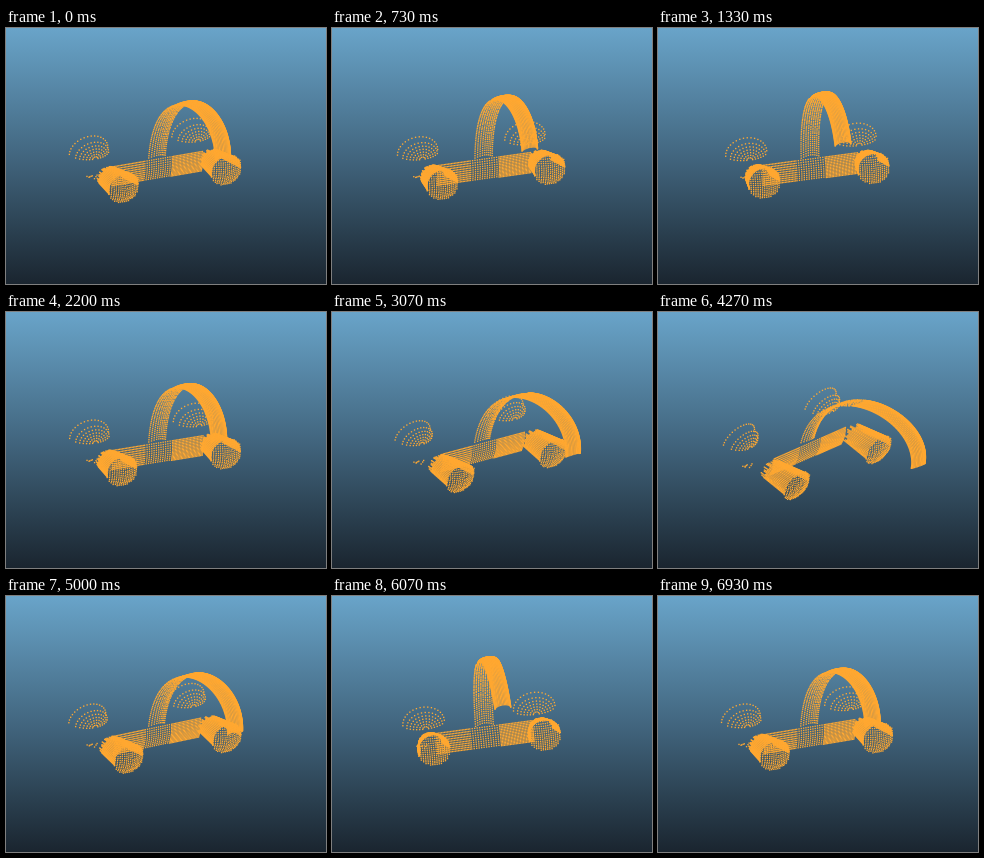
An HTML page with a canvas that plays this animation: 320 px wide and 256 px high, repeating every 6.99 s.

```html
<!DOCTYPE html>
<html>
<head>
<meta charset="utf-8">
<title>Point cloud</title>
<style>
html, body { margin: 0; width: 100%; height: 100%; overflow: hidden; background: #1b2630; }
canvas { display: block; }
</style>
</head>
<body>
<canvas id="stage" width="320" height="256"></canvas>
<script>
const ctx = document.getElementById('stage').getContext('2d');
const LOOP = 6990, STEPS = 105;
const { sin, cos, PI, abs, floor, sqrt } = Math;
const mix = (a, b, u) => a + (b - a) * u;

let seed = 7;
const random = () => (seed = seed * 16807 % 2147483647) / 2147483647;
const jitter = size => (random() - .5) * size;

// The camera swings between these turning points: time, yaw
const turns = [[-1020, .07], [130, .47], [1060, .16], [4200, .92], [5970, .07], [7120, .47]];

function yawAt(t) {
  const i = turns.findIndex(turn => turn[0] > t);
  const [t0, from] = turns[i - 1], [t1, to] = turns[i];
  const u = (t - t0) / (t1 - t0);
  return mix(from, to, mix(u, (1 - cos(PI * u)) / 2, .5));
}

const points = [];
const add = (x, y, z) => points.push([x, y, z]);

function addBar() {
  for (let x = -49; x < 49; x += abs(x) < 15 ? 2.5 : 1.5)
    for (let y = 0; y > -23; y -= x > 15 ? 1.6 : 2.4) add(x, y, 1.5 * sin(-y / 7));
}

const bezier = (a, b, c, d, u) => {
  const v = 1 - u;
  return a * v * v * v + 3 * b * v * v * u + 3 * c * v * u * u + d * u * u * u;
};

// Thin sheet at the post, solid half tube along the front
function addHandle() {
  for (let u = 0; u <= 1; u += u < .4 ? .009 : .006) {
    const solid = u > .4, n = solid ? 18 : 8, r = solid ? 8 : 9;
    for (let i = 0; i <= n; i++) {
      const f = PI * i / n;
      const w = solid ? 0 : jitter(.03 * u);
      const lift = r * sin(f) * (solid ? .75 : .45);
      add(1 + 8 * u - r * (solid ? cos(f) : 1 - 2 * i / n),
        bezier(0, 95, 135, 70, u + w) + lift,
        bezier(-5, -8, 128, 132, u + w) + lift);
    }
  }
}

function addFrontLeg(side) {
  const cx = side * 56, front = 42;
  for (let d = 0; d <= 200; d += 6) {
    const f = d * PI / 180;
    for (let z = 3 + random() * 8; z <= front; z += 1.5) {
      const k = z / front, r = mix(11, 16, k);
      add(cx + r * cos(f), 9 * (k - 1) + r * sin(f), z);
    }
  }
  for (let x = -16; x <= 16; x += 2.2)
    for (let y = -18; y <= 16; y += 2.2) {
      const q = (x * x + y * y) / 300;
      if (q <= 1) add(cx + x, y, front + 5 * (1 - q) + jitter(1));
    }
}

function addBackDome(side) {
  for (let j = 1; j <= 7; j++) {
    const s = j / 7, n = 3 + 2 * j;
    for (let i = 0; i <= n; i++) {
      const f = PI * i / n;
      add(side * 56 + 21 * s * cos(f), -5 + 17 * s * sin(f), -45 + 17 * sqrt(1 - s * s));
    }
  }
}

addBar();
addHandle();
for (const side of [-1, 1]) {
  addFrontLeg(side);
  addBackDome(side);
}
for (let i = 0; i < 8; i++) add(-67 + 1.4 * i, -20 + jitter(4), -20 + jitter(4));

const sky = ctx.createLinearGradient(0, 0, 0, 256);
sky.addColorStop(0, '#69a4c9');
sky.addColorStop(.5, '#42667f');
sky.addColorStop(1, '#1a252f');

function draw(t) {
  const yaw = yawAt(t), pitch = .345 + .385 * yaw, roll = -.14 + .45 * yaw;
  const ca = cos(yaw), sa = sin(yaw), cp = cos(pitch), sp = sin(pitch);
  const cr = cos(roll), sr = sin(roll);
  ctx.fillStyle = sky;
  ctx.fillRect(0, 0, 320, 256);
  ctx.fillStyle = '#ffa832';
  for (const [x, y, z] of points) {
    const h = x * ca + z * sa;
    const v = (z * ca - x * sa) * sp - y * cp;
    ctx.fillRect(151.4 + h * cr - v * sr, 130.4 + h * sr + v * cr, 1.35, 1.35);
  }
}

function frame() {
  const step = floor(performance.now() % LOOP / LOOP * STEPS);
  draw(step * LOOP / STEPS);
  requestAnimationFrame(frame);
}
frame();
</script>
</body>
</html>
```
